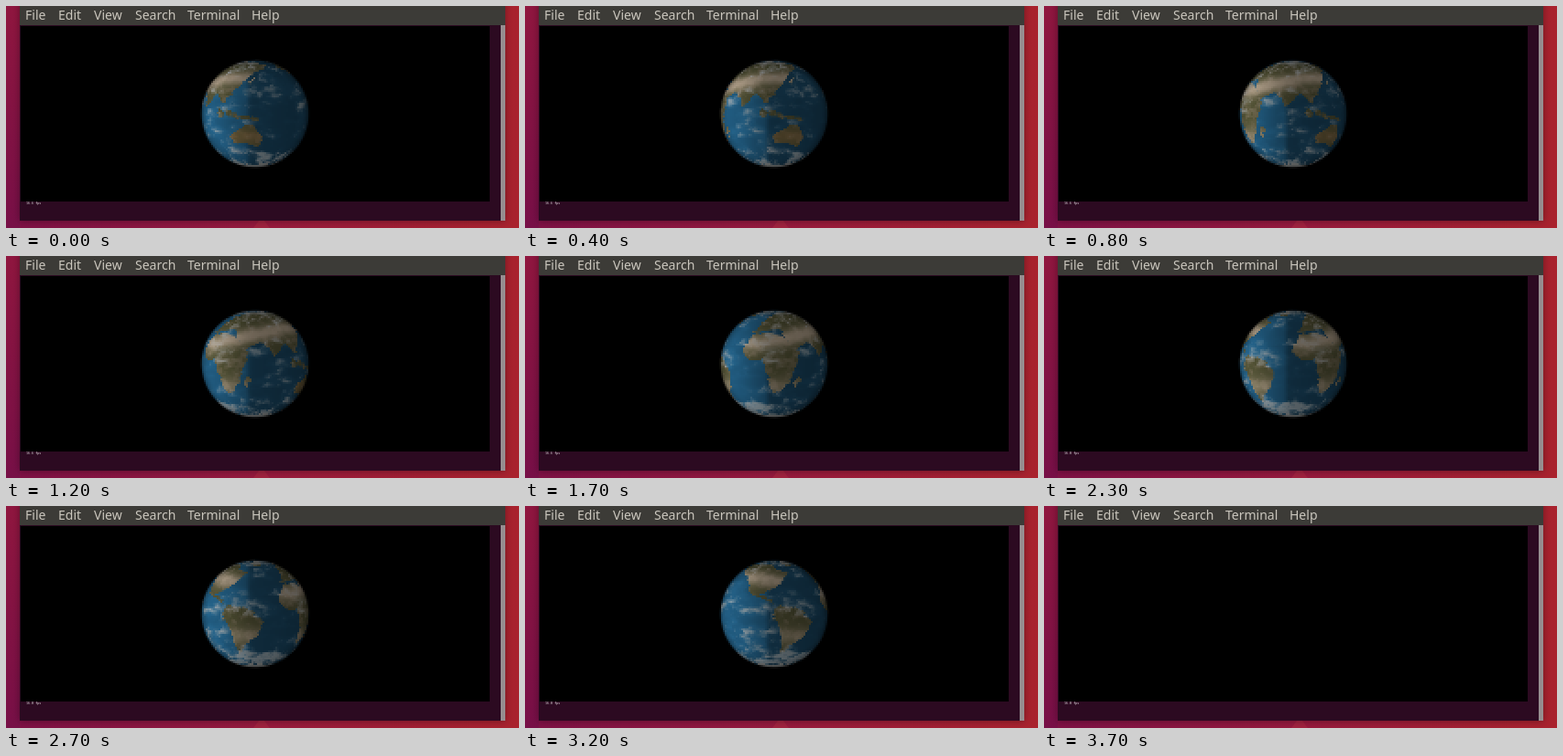
Animation, 560 px wide and 243 px high, one loop 5 s. Source, as an HTML page with a canvas:

```html
<!DOCTYPE html>
<html lang="en">
<head>
<meta charset="utf-8">
<title>Terminal globe</title>
<style>
html, body { margin: 0; width: 100%; height: 100%; overflow: hidden; background: #8a123f; }
#stage { position: absolute; left: 0; top: 0; width: 560px; height: 243px; overflow: hidden; }
canvas { position: absolute; left: 0; top: 0; }
.menu span { position: absolute; top: 0; font: 14px/20px "Noto Sans", "Open Sans", sans-serif; color: #cac6bd; white-space: pre; }
#fps { position: absolute; left: 22px; top: 213px; font: 3.4px/5px "Noto Sans Mono", "DejaVu Sans Mono", monospace; color: #e8e4e6; white-space: pre; }
</style>
</head>
<body>
<div id="stage">
  <canvas id="view" width="560" height="243"></canvas>
  <div class="menu">
    <span style="left:21px">File</span>
    <span style="left:57px">Edit</span>
    <span style="left:96px">View</span>
    <span style="left:141px">Search</span>
    <span style="left:198px">Terminal</span>
    <span style="left:268px">Help</span>
  </div>
  <div id="fps"></div>
</div>
<script>
const LOOP = 5000, STEP = 100, CLEAR = 3700, STALL = 1800;
const START_LON = 143, TURN = 7.2;
const CELL = 2, R = 58.5;
const BOX = { x: 16, y: 22, w: 512, h: 192 };
const CX = BOX.x + BOX.w / 2, CY = BOX.y + BOX.h / 2;
const W = 360, H = 180, DEG = 180 / Math.PI;

const ctx = document.getElementById('view').getContext('2d');
const fps = document.getElementById('fps');

const clamp = v => Math.max(0, Math.min(1, v));
const smooth = (a, b, v) => { const t = clamp((v - a) / (b - a)); return t * t * (3 - 2 * t); };
const bell = (v, mid, width) => Math.exp(-(((v - mid) / width) ** 2));
const mod = (v, n) => ((v % n) + n) % n;
const mix = (a, b, t) => a.map((v, i) => v + (b[i] - v) * t);

// ---- rough land mask, one pixel per degree; noise shapes the coasts ----
const mapCanvas = document.createElement('canvas');
mapCanvas.width = W;
mapCanvas.height = H;
const map = mapCanvas.getContext('2d', { willReadFrequently: true });

function land(...p) {
  map.beginPath();
  for (let i = 0; i < p.length; i += 2) map.lineTo(p[i] + 180, 90 - p[i + 1]);
  map.fill();
}
function isle(lon, lat, rx, ry, tilt = 0) {
  map.beginPath();
  map.ellipse(lon + 180, 90 - lat, rx, ry, tilt, 0, 7);
  map.fill();
}

land(-17,15, -6,36, 32,31, 51,12, 40,-15, 30,-31, 19,-35, 9,4, -8,4);                    // Africa
land(-9,37, 8,60, 30,71, 105,78, 178,68, 140,50, 121,30, 107,10, 92,22, 78,8, 69,23,
  58,24, 45,13, 35,30, 27,39);                                                           // Eurasia
land(-165,62, -125,70, -85,68, -78,58, -56,52, -81,28, -97,22, -80,8, -105,20, -124,45); // North America
land(-78,8, -52,4, -35,-7, -41,-22, -58,-38, -70,-54, -72,-18, -81,-4);                  // South America
land(114,-24, 131,-12, 142,-12, 153,-27, 146,-38, 130,-32, 115,-35);                     // Australia
isle(47, -19, 2.5, 7, 0.3);   // Madagascar
isle(138, 37, 2, 7, 0.7);     // Japan
isle(-42, 72, 14, 11);        // Greenland
for (let i = 0; i < 5; i++) isle(102 + i * 10, 1 - i * 1.6, 5, 2.6, i ? 0.3 : 0.9);
map.fillRect(0, 161, W, 19);  // Antarctica

// ---- colours ----
function hash(x, y) {
  const s = Math.sin(x * 127.1 + y * 311.7) * 43758.5453;
  return s - Math.floor(s);
}
function noise(x, y, wrap) {
  const ix = Math.floor(x), iy = Math.floor(y);
  const fx = smooth(0, 1, x - ix), fy = smooth(0, 1, y - iy);
  const at = (a, b) => hash(mod(ix + a, wrap), iy + b);
  const top = at(0, 0) + (at(1, 0) - at(0, 0)) * fx;
  const low = at(0, 1) + (at(1, 1) - at(0, 1)) * fx;
  return top + (low - top) * fy;
}
function fbm(x, y, size, stretch) {
  let sum = 0, amp = 0.5;
  for (let s = size; amp > 0.06; s /= 2, amp /= 2) sum += amp * noise(x / s, y / s * stretch, W / s);
  return sum / 0.94;
}

const SEA = [38, 102, 142], DEEP = [33, 92, 129], GREEN = [84, 84, 54], TAN = [116, 107, 82];
const SAND = [180, 163, 140], RED = [140, 110, 68], SNOW = [165, 168, 166], CLOUD = [176, 181, 182];

const mask = map.getImageData(0, 0, W, H).data;
const earth = [];
for (let y = 0; y < H; y++) {
  for (let x = 0; x < W; x++) {
    const lon = x - 179.5, lat = 89.5 - y;
    const fine = fbm(x, y, 8, 1.4);
    const wide = fbm(x + (fine - 0.5) * 14, y, 24, 2.2);
    const mx = mod(Math.round(x + (fine - 0.5) * 9), W);
    const my = Math.max(0, Math.min(H - 1, Math.round(y + (wide - 0.5) * 6)));
    const ground = mask[(my * W + mx) * 4 + 3] / 255;

    // The dry belt climbs north away from the prime meridian
    const dry = lat > 0
      ? bell(lat, 22 + 20 * clamp(Math.abs(lon) / 100), 10)
      : bell(lat, -25, 10) * 0.6;
    let soil = mix(GREEN, TAN, smooth(0.4, 0.75, fine) * 0.8);
    soil = mix(soil, lat < 0 && lon > 100 ? RED : SAND, clamp(dry * (0.75 + 0.5 * fine)));
    soil = mix(soil, SNOW, lat < -66 ? 1 : smooth(62, 78, lat));

    const belts = 0.2 * smooth(-32, -54, lat) + 0.1 * smooth(44, 62, lat) + 0.05 * bell(lat, 4, 8);
    const cloud = smooth(0.54, 0.82, wide * 0.62 + fine * 0.38 + belts) * 0.8;
    const sea = mix(DEEP, SEA, smooth(0.3, 0.65, wide));
    earth.push({
      color: mix(mix(sea, soil, ground), CLOUD, cloud),
      water: (1 - ground) * (1 - cloud)
    });
  }
}

// ---- drawing ----
function rect(color, x, y, w, h) {
  ctx.fillStyle = color;
  ctx.fillRect(x, y, w, h);
}
function blend(x1, y1, ...colors) {
  const g = ctx.createLinearGradient(0, 0, x1, y1);
  colors.forEach((c, i) => g.addColorStop(i / (colors.length - 1), c));
  return g;
}
function drawDesk() {
  rect(blend(560, 0, '#7d1045', '#96193d', '#a9222d'), 0, 0, 560, 243);
  rect(blend(0, 243, '#90163f', '#770f47'), 0, 0, 15, 243);
  ctx.fillStyle = '#a0223f';
  ctx.beginPath();
  ctx.moveTo(270, 243);
  ctx.lineTo(279, 231);
  ctx.lineTo(288, 243);
  ctx.fill();

  ctx.shadowColor = 'rgba(0,0,0,0.35)';
  ctx.shadowBlur = 8;
  rect('#2c0a21', 15, -20, 530, 255);
  ctx.shadowBlur = 0;
  ctx.shadowColor = 'transparent';
  rect('#3c3b37', 15, 0, 530, 21);
  rect('#968e90', 540, 21, 5, 214);
}
function drawGlobe(mid) {
  for (let y = CY - 60; y < CY + 60; y += CELL) {
    const v = (CY - y - CELL / 2) / R;
    const lat = Math.asin(Math.max(-1, Math.min(1, v))) * DEG;
    const row = Math.min(H - 1, Math.floor(90 - lat));
    for (let x = CX - 60; x < CX + 60; x += CELL) {
      const u = (x + CELL / 2 - CX) / R, r = Math.hypot(u, v);
      const edge = clamp((1 - r) * R / CELL + 0.5);
      if (!edge) continue;
      const z = Math.sqrt(Math.max(0, 1 - r * r));
      const col = mod(Math.floor(mid + Math.atan2(u, z) * DEG + 180), W);
      const { color, water } = earth[row * W + col];
      // Sun from the left; open water drops off sharply near the middle
      const sun = 0.6 - 0.1 * u + 0.3 * smooth(0.05, -0.9, u);
      const dusk = 1 - 0.25 * water * smooth(-0.2, -0.06, u);
      const limb = 0.6 + 0.4 * smooth(0, 0.55, z);
      const c = color.map(k => Math.round(k * sun * dusk * limb * edge));
      rect(`rgb(${c})`, x, y, CELL, CELL);
    }
  }
}

drawDesk();
const begin = performance.now();
let shown = -1;

function tick() {
  const t = (performance.now() - begin) % LOOP;
  const slot = Math.floor(Math.min(t, CLEAR) / STEP);
  if (slot !== shown) {
    shown = slot;
    rect('#000', BOX.x, BOX.y, BOX.w, BOX.h);
    const stalled = slot * STEP >= STALL ? 1 : 0;
    if (slot * STEP < CLEAR) drawGlobe(START_LON - TURN * (slot - stalled));
    fps.textContent = slot * STEP > STALL ? '16.8 fps' : '16.6 fps';
  }
  requestAnimationFrame(tick);
}
tick();
</script>
</body>
</html>
```
